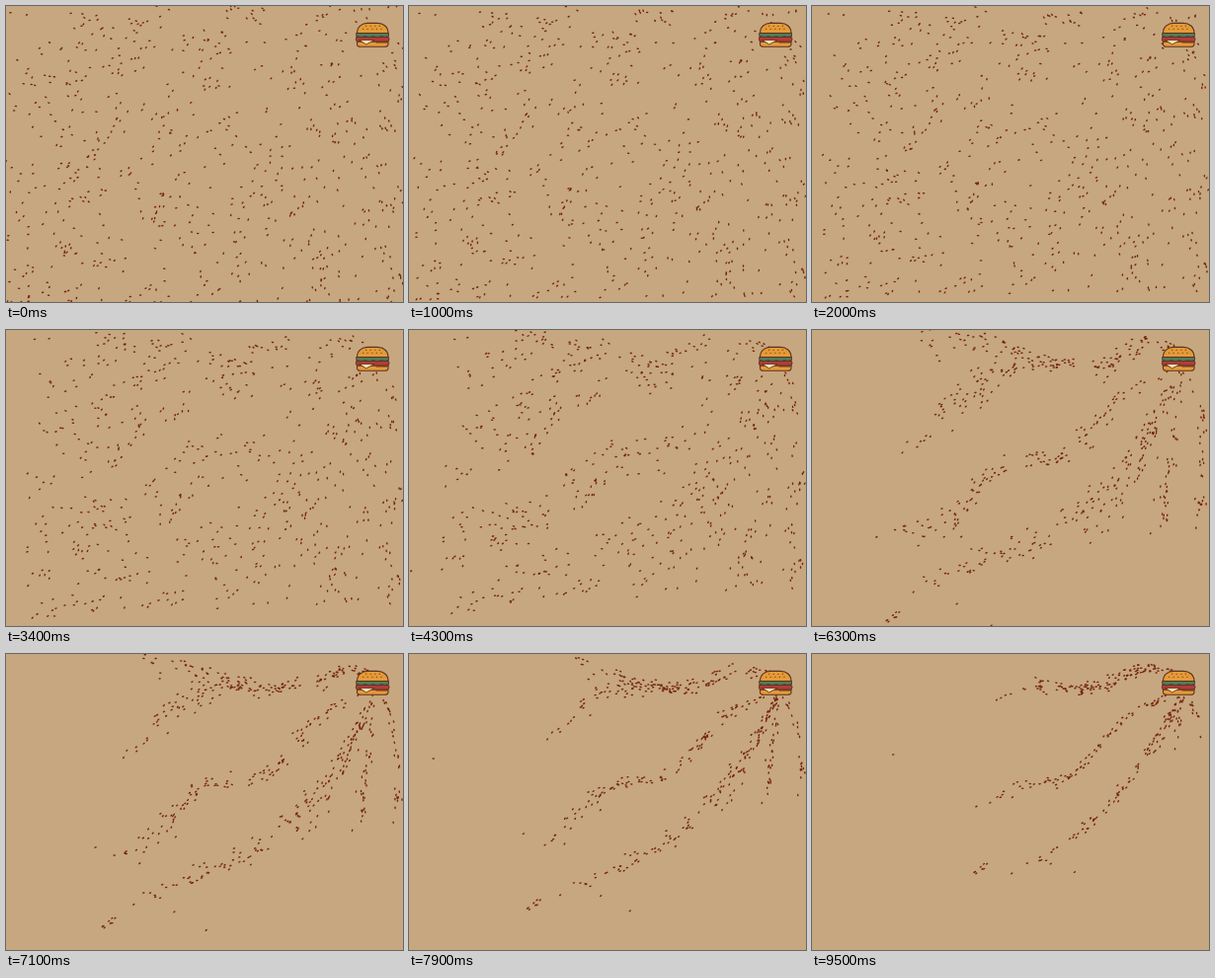
These frames come from a looping animation (402x300 px, 9600 ms). An HTML page with a canvas:

```html
<!DOCTYPE html>
<html lang="en">
<head>
<meta charset="utf-8">
<title>Ants and burger</title>
<style>
  html, body { margin: 0; width: 100%; height: 100%; overflow: hidden; background: #c6a77f; }
  canvas { display: block; width: 402px; height: 300px; }
</style>
</head>
<body>
<canvas id="stage" width="402" height="300"></canvas>
<script>
const W = 402, H = 300, LOOP = 9600, STEP = 100;
const COUNT = 690, CRUISE = 36, GOAL = [371, 31];
const ctx = document.getElementById('stage').getContext('2d');

let seed = 73;
function rnd() {
  seed = (seed + 0x6d2b79f5) | 0;
  let z = Math.imul(seed ^ (seed >>> 15), 1 | seed);
  z = (z + Math.imul(z ^ (z >>> 7), 61 | z)) ^ z;
  return ((z ^ (z >>> 14)) >>> 0) / 4294967296;
}
const spread = r => (rnd() - 0.5) * 2 * r;
const clamp = (v, a, b) => Math.max(a, Math.min(b, v));
const mix = (a, b, k) => a + (b - a) * k;

// A line with a sideways bow and a ripple, sampled every pixel back from its end.
function makeTrail(from, to, { bow = 0, skew = 1, wave = 0, cycles = 0, peak = 0 } = {}) {
  const steep = Math.abs(to[0] - from[0]) < Math.abs(to[1] - from[1]) / 1.5;
  const pts = [to];
  for (let u = 1; u >= 0; u -= 0.0005) {
    const v = u ** skew;
    const taper = Math.min(1, 8 * (1 - u));
    const off = bow * Math.sin(Math.PI * v) +
      wave * taper * Math.cos(2 * Math.PI * cycles * (v - peak));
    const x = mix(from[0], to[0], u) + (steep ? off : 0);
    const y = mix(from[1], to[1], u) + (steep ? 0 : off);
    const last = pts[pts.length - 1];
    if (Math.hypot(x - last[0], y - last[1]) >= 1) pts.push([x, y]);
  }
  return pts;
}

const trails = [
  makeTrail([-40, 10], [366, 18], { bow: 3, skew: 1.5, wave: 14, cycles: 1.55, peak: 0.64 }),
  makeTrail([-50, 185], [366, 18], { bow: -36, skew: 1.3, wave: 10, cycles: 2.1, peak: 0.76 }),
  makeTrail([-60, 245], [360, 42], { bow: 32, wave: 12, cycles: 3.1, peak: 0.45 }),
  makeTrail([0, 345], [373, 43], { bow: 57, skew: 2.1 }),
  makeTrail([230, 330], [373, 43], { bow: 4 }),
  makeTrail([352, 350], [374, 42], { bow: -3 }),
  makeTrail([388, 350], [380, 42], { bow: 15, skew: 3 })
];

function trailAt(trail, s) {
  s = clamp(s, 0, trail.length - 1.01);
  const i = Math.floor(s), a = trail[i], b = trail[i + 1];
  return [mix(a[0], b[0], s - i), mix(a[1], b[1], s - i)];
}

// The crowd starts slowly and speeds up between 2 s and 6.3 s.
function travelled(t) {
  const span = 4.3, u = clamp((t - 2) / span, 0, 1);
  return 6 * t + 31 * (span * (u ** 3 - u ** 4 / 2) + Math.max(0, t - 2 - span));
}

// Each ant joins the nearest trail and drifts onto it as it walks.
function makeAnt(x, y) {
  let best = Infinity, trail, start;
  for (const tr of trails) {
    tr.forEach((p, i) => {
      const d = (p[0] - x) ** 2 + (p[1] - y) ** 2;
      if (d < best) { best = d; trail = tr; start = i; }
    });
  }
  if (start < 14) {
    trail = makeTrail([x, y], GOAL);
    start = trail.length - 1;
  }
  const dx = x - trail[start][0], dy = y - trail[start][1];
  const pace = 0.86 + rnd() * 0.24, reach = 60 + 140 * rnd() ** 2;
  const jx = spread(3), jy = spread(3), phase = rnd() * 6.28;
  const at = t => {
    const d = travelled(t) * pace, s = start - d;
    if (s <= 0 || trail.length < 3) return null;
    const [px, py] = trailAt(trail, s);
    const keep = Math.exp(-((d / reach) ** 1.2)) * Math.sqrt(s / start);
    const loose = 1 - Math.exp(-d / 60);
    const sway = Math.sin(t * 3 + phase) * 0.7 * loose;
    return [px + dx * keep + jx * loose + sway, py + dy * keep + jy * loose - sway];
  };
  return { at, turn: spread(0.8) };
}

// Late ants enter at an edge and walk straight on.
function makeLate(t0, x, y, angle) {
  const at = t => {
    const d = (t - t0) * CRUISE;
    return d < 0 ? null : [x + d * Math.cos(angle), y + d * Math.sin(angle)];
  };
  return { at, turn: 0 };
}

const ants = [];
let x = 200, y = 150;
while (ants.length < COUNT) {
  const near = rnd() < 0.36;
  x = near ? clamp(x + spread(13), 0, W) : rnd() * W;
  y = near ? clamp(y + spread(13), 0, H) : rnd() * H;
  ants.push(makeAnt(x, y));
}
ants.push(
  makeLate(4.2, -1, 246, -0.5),
  makeLate(7.1, -4, 108, -0.07),
  makeLate(6.2, 179, 302, -0.75),
  makeLate(5.1, 111, 302, -0.6)
);
for (let i = 0; i < 8; i++) {
  ants.push(makeLate(5.9 + spread(0.25), 70 + spread(3), 301 + spread(2), -0.69));
}

function drawAnt(ant, t) {
  const p = ant.at(t);
  if (!p) return;
  const q = ant.at(t + 0.05) || GOAL;
  const settle = 1 - 0.6 * clamp(t / 7, 0, 1);
  const angle = Math.atan2(q[1] - p[1], q[0] - p[0]) + ant.turn * settle;
  ctx.beginPath();
  ctx.ellipse(p[0], p[1], 1.3, 0.75, angle, 0, 2 * Math.PI);
  ctx.fill();
}

function shape(path, fill, line) {
  const p = new Path2D(path);
  if (fill) { ctx.fillStyle = fill; ctx.fill(p); }
  ctx.strokeStyle = '#5a3220';
  ctx.lineWidth = line;
  ctx.stroke(p);
}

function drawBurger() {
  const bun = '#e59a38';
  ctx.lineJoin = ctx.lineCap = 'round';
  shape('M355.5 36H387V38.5Q387 41.3 383.5 41.3H359Q355.5 41.3 355.5 38.5Z', bun, 1.1);
  shape('M355 31.5H387.4Q388.8 33.8 387 36H355.3Q353.4 33.8 355 31.5Z', '#b63a3a', 1);
  shape('M358 34.5H373L365 38.8Z', '#f5dfb4', 0.8);
  shape('M375 37H386', null, 0.9);
  shape('M355 27.5H387.5V30.5Q384 32.5 380 30.8Q376 33 372 30.8Q368 33 364 30.8Q359 33 355 30.5Z', '#4d7d5a', 0.9);
  shape('M355.5 27.5C355.5 20.5 361 17.4 366 17.4H376C382 17.4 387 21 387 27.5Z', bun, 1.1);
  ctx.fillStyle = '#7d4820';
  for (let row = 0; row < 2; row++) {
    for (let i = 0; i < 4 + row; i++) {
      ctx.fillRect(364 - row * 3 + i * 4.6, 19.8 + row * 3, 1.2, 1.1);
    }
  }
}

function render(ms) {
  ctx.fillStyle = '#c6a77f';
  ctx.fillRect(0, 0, W, H);
  ctx.fillStyle = '#74230f';
  for (const ant of ants) drawAnt(ant, ms / 1000);
  drawBurger();
}

const began = performance.now();
let shown = -1;
function tick() {
  const ms = Math.floor(((performance.now() - began) % LOOP) / STEP) * STEP;
  if (ms !== shown) render(shown = ms);
  requestAnimationFrame(tick);
}
tick();
</script>
</body>
</html>
```
